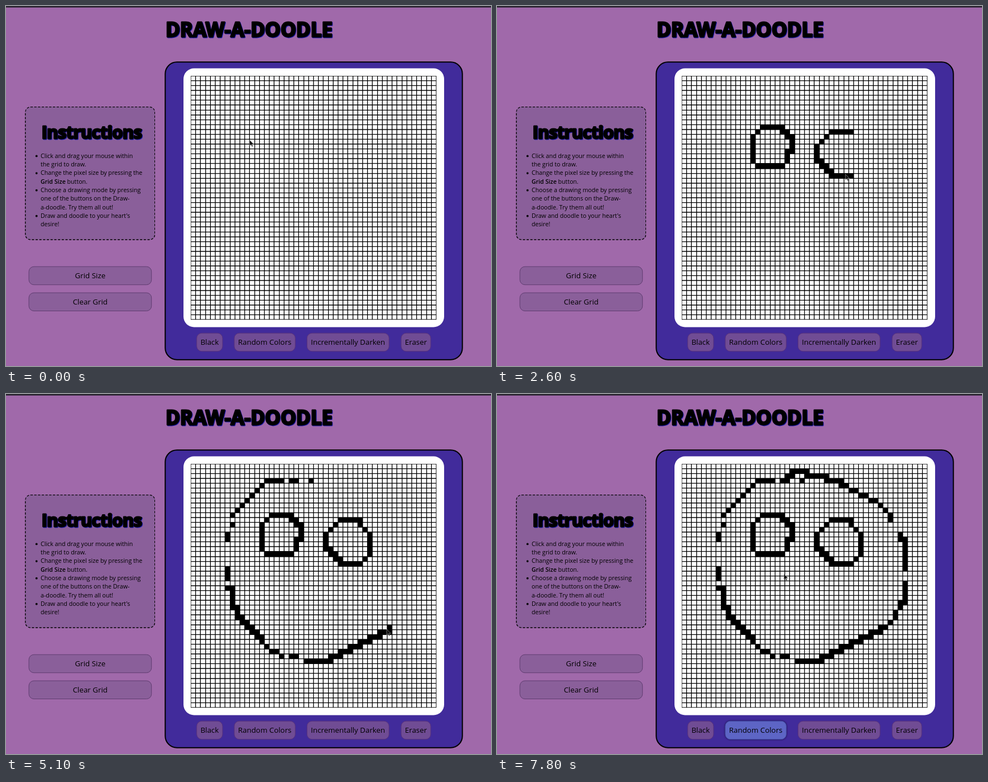
Recreate the animation shown at these times as an HTML page. Size 869x644 px, loop 8000 ms.

```html
<!DOCTYPE html>
<html lang="en">
<head>
<meta charset="utf-8">
<title>Drawing grid</title>
<style>
  html, body { margin: 0; width: 100%; height: 100%; overflow: hidden; background: #a069aa; }
  svg { display: block; position: relative; }
  text { font-family: "Open Sans", "Noto Sans", sans-serif; font-size: 10.667px; }
  #card { position: absolute; left: 34.2px; top: 180.3px; width: 350px; height: 358px; box-sizing: border-box;
    border: 2px dashed #000; border-radius: 15px; background: #8a5f9a; transform: scale(.6667); transform-origin: 0 0; }
  .marker { font-weight: 700; text-anchor: middle; stroke: #000; stroke-width: 2.8px;
    stroke-linejoin: round; filter: drop-shadow(1.2px 1.2px 0 #1a1aa8); }
  .button text { font-size: 13.333px; text-anchor: middle; }
  .button rect { fill: #8a5f9a; stroke: #5f3c70; }
  #modes rect { fill: #704c94; stroke: #57307c; }
  #modes .lit rect { fill: #5d65c5; stroke: #4650a8; filter: drop-shadow(.7px .7px 1.6px #140a40); }
</style>
</head>
<body>
<div id="card"></div>
<svg width="869" height="644" viewBox="0 0 869 644">
  <rect width="869" height="2.7" fill="#2a2531"/>
  <text class="marker" x="435.5" y="55" style="font-size:35px">DRAW-A-DOODLE</text>
  <text class="marker" x="153.5" y="237" style="font-size:31px;letter-spacing:-.7px">Instructions</text>
  <g id="lines"></g>
  <g id="buttons"></g>

  <rect x="285.3" y="100.3" width="532.4" height="532.4" rx="21" fill="#412b9b" stroke="#000" stroke-width="2"/>
  <rect x="318" y="111.5" width="467" height="463" rx="19" fill="#fff"/>
  <svg x="331" y="125" width="440.4" height="436.2">
    <path id="grid" stroke="#000" stroke-width="1.33"/>
    <path id="ink"/>
  </svg>
  <g id="modes"></g>
  <path id="cursor" d="M0 0V10.5L2.5 8.2L4.2 12L5.8 11.3L4.2 7.7H7.4Z" fill="#111" stroke="#ccc" stroke-width=".5"/>
</svg>
<script>
const $ = id => document.getElementById(id);
const COUNT = 50, STEP = 100, LOOP = 8000, ZOOM = 2 / 3;

// Grid lines sit on whole pixels of a page shown at two thirds size
const edgeX = i => Math.round(i * 13.2) * ZOOM;
const edgeY = i => Math.round(i * 13.08) * ZOOM;

// Instruction list; a leading * marks a bullet
$('lines').innerHTML = [
  '*Click and drag your mouse within', 'the grid to draw.',
  '*Change the pixel size by pressing the', '<tspan font-weight="600">Grid Size</tspan> button.',
  '*Choose a drawing mode by pressing', 'one of the buttons on the Draw-', 'a-doodle. Try them all out!',
  "*Draw and doodle to your heart's", 'desire!'
].map((line, i) => {
  const y = 271.8 + i * 15.33;
  const dot = line[0] === '*' ? `<circle cx="54.7" cy="${y - 3.4}" r="1.9"/>` : '';
  return `${dot}<text x="62" y="${y}">${line.replace('*', '')}</text>`;
}).join('');

const button = (label, x, y, w) => `<g class="button">
  <rect x="${x}" y="${y}" width="${w}" height="32.5" rx="9"/>
  <text x="${x + w / 2}" y="${y + 21.2}">${label}</text></g>`;
$('buttons').innerHTML = button('Grid Size', 41, 466.2, 219.7) + button('Clear Grid', 41, 513, 219.7);
$('modes').innerHTML = button('Black', 341.7, 585.2, 46.3) + button('Random Colors', 409, 585.2, 109.3)
  + button('Incrementally Darken', 539.3, 585.2, 147) + button('Eraser', 708, 585.2, 53);

let gridPath = '';
for (let i = 0; i <= COUNT; i++)
  gridPath += `M${edgeX(i)} 0V${edgeY(COUNT)}M0 ${edgeY(i)}H${edgeX(COUNT)}`;
$('grid').setAttribute('d', gridPath);

// Pointer paths in grid cells; drawing ones ink every cell they cross
const move = (start, end, d) => {
  const path = document.createElementNS('http://www.w3.org/2000/svg', 'path');
  path.setAttribute('d', d);
  return { start, end, path, length: path.getTotalLength() };
};
const stroke = (...args) => ({ ...move(...args), inks: true });
const actions = [
  move(200, 400, 'M11.5 13L17.4 11.8'),
  stroke(800, 1600, 'M18 10H16L14 12V17L15 18H20L21 17V15H22V12L19 10H17'),
  move(1600, 1800, 'M17.5 10L32.3 11.3'),
  stroke(2200, 2800, 'M34 11H30L27 14V16L30 20H34L36 18V14L34 12'),
  move(2900, 3300, 'M35 13L24.3 3.3'),
  stroke(3500, 4300, 'M24 3h.1M21 3H20M18 3H15L11 7 8 10M8 12h.1M7 14v1M7 17h.1M7 19h.1M7 21v2M7 25H8V28L10 32 13 34 15 37'),
  stroke(4600, 5500, 'M16 38H17L18 39M20 39H21M23 40H27L39 34 42 32 45 27V24M45 21V16L44 14'),
  stroke(5600, 6500, 'M42 11V10L39 7 34 5 33 4 31 3H29V2H25V1H23L21 2'),
  move(6500, 6800, 'M21 2Q15 30 16.5 49.4'),
  move(7000, 7400, 'M16.5 49.4L13.5 55.1'),
  move(7500, 7800, 'M13.5 55.1Q18 45 20.3 22.4')
];

const reach = (a, t) => a.length * Math.min(1, Math.max(0, (t - a.start) / (a.end - a.start)));

function inkPath(t) {
  const cells = new Set();
  for (const a of actions.filter(a => a.inks && a.start <= t)) {
    const end = reach(a, t);
    for (let s = 0; s < end + .5; s += .5) {
      const p = a.path.getPointAtLength(Math.min(s, end));
      const x = Math.round(p.x), y = Math.round(p.y);
      cells.add(`M${edgeX(x)} ${edgeY(y)}H${edgeX(x + 1)}V${edgeY(y + 1)}H${edgeX(x)}z`);
    }
  }
  return [...cells].join('');
}

function draw(now) {
  const t = Math.floor(now % LOOP / STEP) * STEP;
  $('ink').setAttribute('d', inkPath(t));
  // while drawing, the pointer trails the newest cell
  const a = actions.filter(a => a.start <= t).pop() || actions[0];
  const tip = a.path.getPointAtLength(Math.max(0, reach(a, t) - (a.inks ? 1.2 : 0)));
  $('cursor').setAttribute('transform', `translate(${335.4 + tip.x * 8.8} ${126.4 + tip.y * 8.72})`);
  $('modes').children[1].classList.toggle('lit', t >= 7200);
  requestAnimationFrame(() => draw(performance.now() - begin));
}
const begin = performance.now();
draw(0);
</script>
</body>
</html>
```
